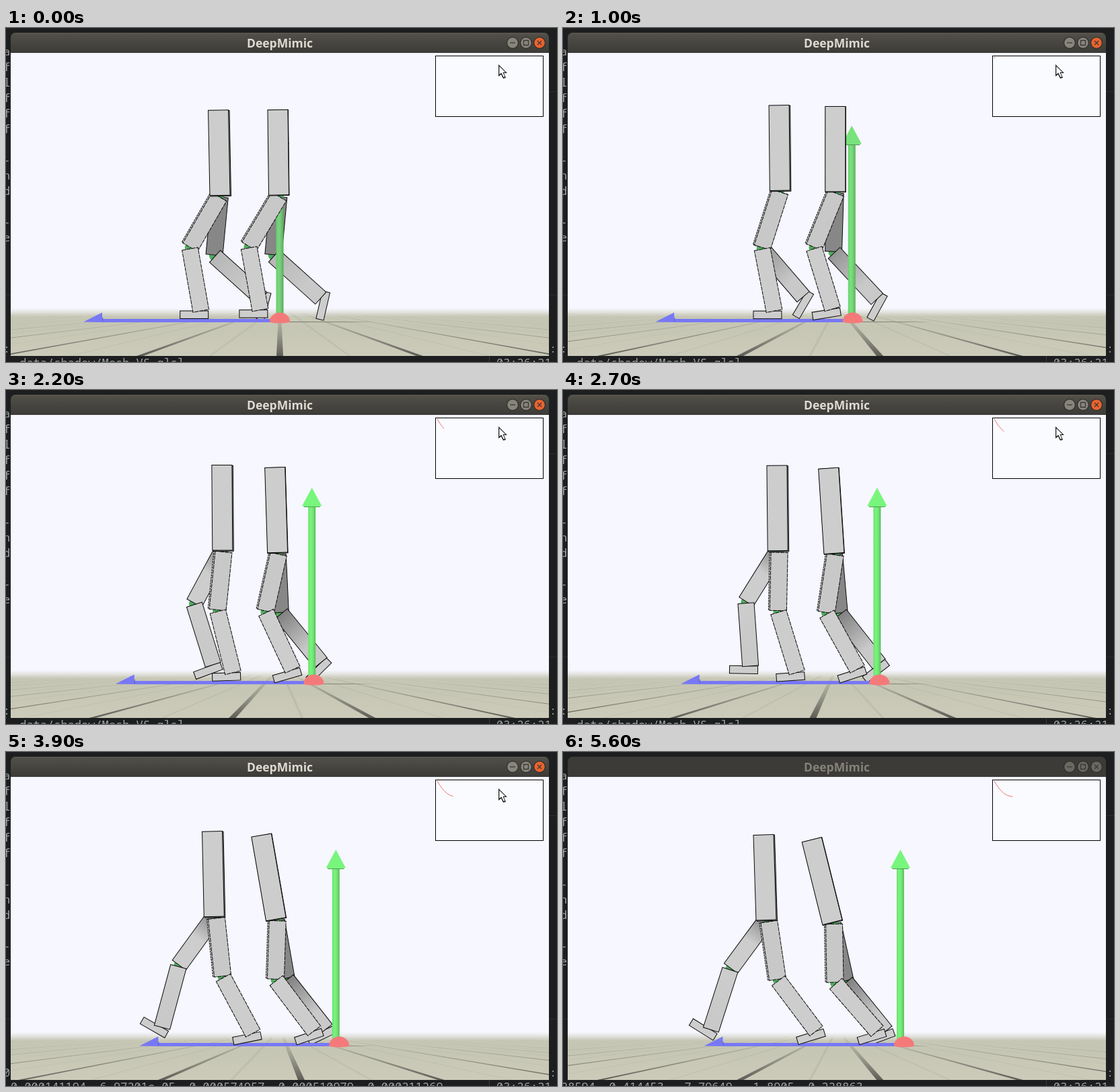
Write an HTML page with a canvas that moves like this. It is 819 px wide and 496 px high and loops after 5700 ms.

```html
<!DOCTYPE html>
<html lang="en">
<head>
<meta charset="utf-8">
<title>Walk imitation</title>
<style>
html, body { margin: 0; width: 819px; height: 496px; overflow: hidden; background: #1c1e1f; }
canvas { display: block; }
</style>
</head>
<body>
<canvas id="stage" width="819" height="496"></canvas>
<script>
const c = document.getElementById('stage').getContext('2d');
const LOOP = 5700, WALK = 4400, REFRESHES = 23;
const CURSOR_OFF = 5200, DIMMED = 5600;
const INK = '#0a0a0a', LIGHT = 205;
const MONO = '17px "Noto Sans Mono", "DejaVu Sans Mono", monospace';

const clamp = v => Math.max(0, Math.min(1, v));
const mix = (a, b, u) => a + (b - a) * u;
const grey = v => `rgb(${v},${v},${v})`;

const linear = u => u;
const smooth = u => (1 - Math.cos(Math.PI * u)) / 2;
const late = u => u ** 3;

// value going from a to b, with an extra bulge halfway
const move = (a, b, bulge = 0, ease = linear) => u => mix(a, b, ease(u)) + bulge * 4 * u * (1 - u);

// legs: thigh, shin and foot angles in degrees
const LEFT = {
  x: move(318, 302, 11.5), y: move(249, 250, -11), tilt: move(-1.1, -1.8, 1), hip: move(0, 4), edge: 1.5,
  near: [move(-30, 8.5, 5.7), move(10, 37, 1, late), move(0, -17, 0, late)],
  far: [move(-5.5, -36.4, -8), move(48, -17.8, 0, smooth), move(-75, 32, 5, smooth)]
};
const RIGHT = {
  x: move(405.5, 400.5, .5), y: move(248.5, 253.5, -9), tilt: move(-.7, -14, 5.3), hip: move(1.5, 2.5), edge: .5,
  near: [move(-31, 1, 3), move(10.3, 41), move(0, -17, -8)],
  far: [move(-5.3, 12.5, -.5), move(48, 39, -4.5), move(-77, -20, 5)]
};
const axisX = move(407, 501.5, 2.5);

function gradient(x0, y0, x1, y1, ...stops) {
  const g = c.createLinearGradient(x0, y0, x1, y1);
  stops.forEach(([at, color]) => g.addColorStop(at, color));
  return g;
}

function rect(color, x, y, w, h) {
  c.fillStyle = color;
  c.fillRect(x, y, w, h);
}

function poly(color, ...pts) {
  c.fillStyle = color;
  c.beginPath();
  pts.forEach(p => c.lineTo(...p));
  c.closePath();
  c.fill();
}

function disc(color, x, y, r) {
  c.fillStyle = color;
  c.beginPath();
  c.arc(x, y, r, 0, 7);
  c.fill();
}

function text(str, x, y, font, color, align = 'left') {
  c.font = font;
  c.fillStyle = color;
  c.textAlign = align;
  c.fillText(str, x, y);
}

// outlined box placed relative to a joint
function box(x, y, deg, l, t, w, h, fill, dash = []) {
  c.save();
  c.translate(x, y);
  c.rotate(deg * Math.PI / 180);
  c.fillStyle = fill;
  c.strokeStyle = INK;
  c.lineWidth = 1;
  c.setLineDash(dash);
  c.fillRect(l, t, w, h);
  c.strokeRect(l, t, w, h);
  c.restore();
}

function tip(x, y, deg, len) {
  const a = deg * Math.PI / 180;
  return [x + len * Math.sin(a), y + len * Math.cos(a)];
}

function leg(x, y, angles, u, far) {
  const [thigh, shin, foot] = angles.map(f => f(u));
  const [kx, ky] = tip(x, y, thigh, 89.5), [ax, ay] = tip(kx, ky, shin, 95);
  const dash = far ? [] : [6, 1];
  let thighFill = grey(200), shinFill = grey(LIGHT);
  if (far) {
    // shadow cast by the near leg
    const thighTone = grey(mix(LIGHT, 135, clamp((thigh + 18) / 10)));
    const shinTone = grey(mix(LIGHT, 128, clamp((shin - 24) / 8) * clamp(.3 + 2 * u)));
    thighFill = gradient(0, 0, 0, 88, [0, grey(135)], [.45, thighTone], [1, thighTone]);
    shinFill = gradient(0, 0, 0, 95, [0, shinTone], [.7, grey(LIGHT - 4)]);
  }
  disc('#4fae5c', x, y, 6);
  disc('#4fae5c', kx, ky, 7.5);
  box(ax, ay, foot, -31, 0, 42, 11.5, grey(LIGHT));
  if (!far) box(x, y, -thigh, -14.5, 2, 25, 86, grey(200), [3, 1]);
  box(x, y, -thigh, -12.5, 2, 25, 86.5, thighFill, dash);
  box(kx, ky, -shin, -12, 1.5, 24, 93.5, shinFill, dash);
}

function farLeg(figure, u) {
  leg(figure.x(u), figure.y(u), figure.far, u, true);
}

function body({ x, y, tilt, hip, near, edge }, u) {
  const px = x(u), py = y(u);
  leg(px + hip(u), py, near, u, false);
  box(px + edge, py + edge / 2, tilt(u), -15, -127, 30, 127, grey(150));
  box(px, py, tilt(u), -15, -127, 30, 126.5, grey(LIGHT));
}

function floor(shift) {
  rect('#f6f7ff', 7, 37, 800, 450);
  rect(gradient(0, 416, 0, 487, [0, '#f6f7ff'], [.07, '#e6e6e4'], [.18, '#c8c8b7'], [.4, '#c6c6b5'], [1, '#cccbba']),
    7, 416, 800, 71);
  c.save();
  c.beginPath();
  c.rect(7, 424, 800, 63);
  c.clip();
  // lines run towards one vanishing point
  const major = gradient(0, 426, 0, 487, [0, 'rgba(90,90,82,.08)'], [.4, 'rgba(85,85,78,.35)'], [1, 'rgba(75,75,70,.85)']);
  const minor = 'rgba(110,110,96,.12)';
  for (let i = -24; i <= 24; i++) {
    const x = 407 + shift * 2.88 + i * 104, w = i % 2 ? 2 : 5;
    poly(i % 2 ? minor : major, [405.5, 412], [408.5, 412], [x + w, 487], [x - w, 487]);
  }
  c.restore();
  rect(gradient(420, 0, 550, 0, [0, '#777770'], [.7, '#8c8c80'], [1, 'rgba(140,140,128,0)']), 407, 436, 143, 1);
}

function arrows(x, base, u) {
  rect('#7878f4', x - 265, 432, base - x + 265, 5);
  poly('#7878f4', [x - 292, 436.5], [x - 264, 422.5], [x - 264, 437]);
  rect('#5c5cc8', x - 264, 430, 1, 6);
  // the green brightens as it leaves the shade
  const lit = clamp(u * 3 - .3);
  const green = k => `rgb(${120 * k},${mix(215, 245, lit) * k},${124 * k})`;
  rect(gradient(x - 6, 0, x + 6, 0, [0, green(.9)], [.35, green(1)], [.6, green(.95)], [1, green(.75)]),
    x - 5.5, 172, 11, 256);
  poly(green(1), [x, 145], [x + 14.5, 172], [x + 10, 173.5], [x - 10, 173.5], [x - 14.5, 172]);
  rect(green(.65), x - 12, 173, 24, 1);
}

function dome(x) {
  c.fillStyle = '#f47a7a';
  c.beginPath();
  c.ellipse(x, 436, 15, 13.5, 0, Math.PI, 0);
  c.ellipse(x, 436, 15, 2.5, 0, 0, Math.PI);
  c.fill();
}

function inset(u) {
  rect('#f9fbff', 638, 41, 161, 91);
  c.strokeStyle = '#000';
  c.lineWidth = 1;
  c.strokeRect(638.5, 41.5, 160, 90);
  // falling curve that levels off
  c.strokeStyle = '#ee6060';
  c.beginPath();
  for (let v = 0; v <= (u - .17) / .83; v += .02) c.lineTo(641 + 28 * v, 66 - 23 * (1 - v) ** 2.2);
  c.stroke();
}

function cursor() {
  poly('#222', [732, 54], [732, 72], [736, 69], [739, 75], [743, 74], [740, 67], [745, 67]);
  poly('#fff', [733.3, 57], [733.3, 69], [736.4, 66.4], [739.6, 73], [741.3, 72.3], [738.4, 65.7], [742.3, 65.7]);
}

function terminal(clock) {
  const color = '#9fa3a3';
  const write = (str, x, y) => text(str, x, y, MONO, color);
  rect('#1c1e1f', 0, 0, 819, 496);
  rect('#2b2d2e', 807, 94, 12, 1);
  rect('#2b2d2e', 0, 396, 819, 1);
  [...'aflfff -nd -e'].forEach((ch, row) => write(ch, -4, 41 + 23 * row));
  const [mark, x, line] = clock < 3200 ? [':', 10, ' data/shadow/Mesh_VS.glsl']
    : clock < 4100 ? ['0', 7, '0.000141194, 6.97201e-05, 0.000574957, 0.000510979, 0.000211269']
    : ['', -3, '28594, 0.414453, -7.79649, -1.8905, 0.228863'];
  write(mark, -4, 482);
  write(':', 808, 482);
  write(line, x, 503);
  write('03:26:21', 729, 503);
  rect('#3a3c3d', 718, 487, 1, 9);
}

function titleBar(active) {
  c.fillStyle = active ? gradient(0, 7, 0, 37, [0, '#5a584f'], [.1, '#504e47'], [1, '#3c3b37']) : '#3c3b37';
  c.beginPath();
  c.roundRect(7, 7, 800, 30, [7, 7, 0, 0]);
  c.fill();
  text('DeepMimic', 407, 29, 'bold 17.5px "Open Sans", "Noto Sans", sans-serif', active ? '#dfdbd2' : '#858279', 'center');
  [753, 773, 793].forEach((x, i) => {
    disc('#2e2d29', x, 22, 9);
    disc(!active ? '#6a6861' : i === 2 ? '#e9632f' : '#87857c', x, 22, 7.8);
    c.strokeStyle = '#3a3934';
    c.lineWidth = 1.3;
    c.beginPath();
    if (i === 0) { c.moveTo(x - 4, 22); c.lineTo(x + 4, 22); }
    if (i === 1) c.rect(x - 3.5, 18.5, 7, 7);
    if (i === 2) {
      c.moveTo(x - 3, 19); c.lineTo(x + 3, 25);
      c.moveTo(x + 3, 19); c.lineTo(x - 3, 25);
    }
    c.stroke();
  });
}

function draw(now) {
  const clock = now % LOOP;
  // the simulation refreshes in even, visible steps
  const u = Math.min(1, Math.floor((clock + 40) / WALK * REFRESHES) / REFRESHES);
  const x = axisX(u), base = x + (x - 407) * .058;
  terminal(clock);
  floor(x - 407);
  farLeg(LEFT, u);
  farLeg(RIGHT, u);
  arrows(x, base, u);
  body(LEFT, u);
  body(RIGHT, u);
  dome(base);
  inset(u);
  titleBar(clock < DIMMED);
  if (clock < CURSOR_OFF) cursor();
}

const start = performance.now();
(function frame() {
  draw(performance.now() - start);
  requestAnimationFrame(frame);
})();
</script>
</body>
</html>
```
